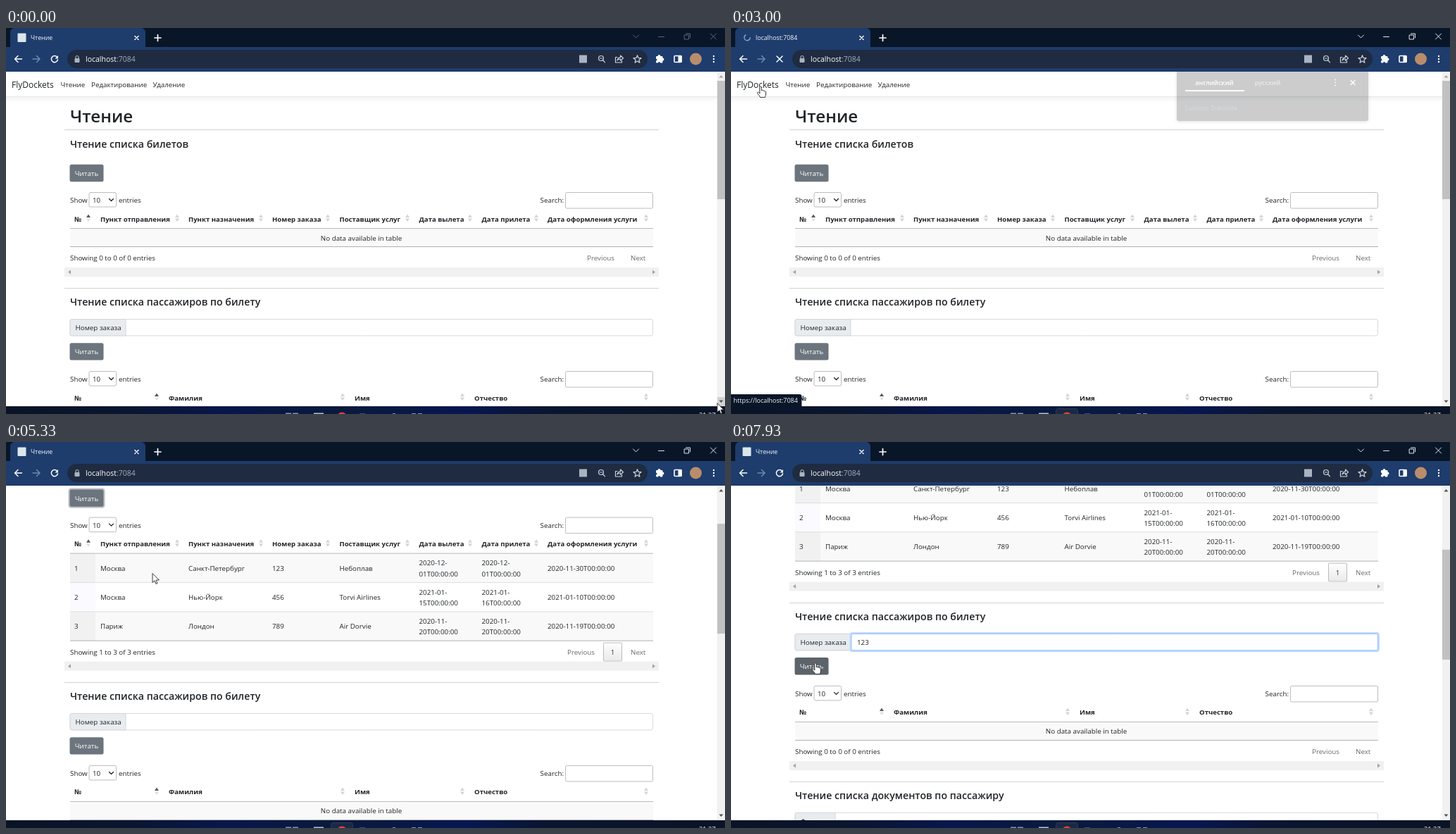
Write an HTML page with a canvas that moves like this. It is 1021 px wide and 548 px high and loops after 8 s.

```html
<!DOCTYPE html>
<html lang="ru">
<head>
<meta charset="utf-8">
<title>Чтение</title>
<style>
html, body { margin: 0; width: 100%; height: 100%; overflow: hidden; background: #fff; }
canvas { display: block; }
</style>
</head>
<body>
<canvas id="stage" width="1021" height="548"></canvas>
<script>
const stage = document.getElementById('stage').getContext('2d');
const layer = new OffscreenCanvas(1021, 548).getContext('2d');
let ctx = stage;
const LOOP = 8000, W = 1021, TOP = 62, BOTTOM = 537;
const FONT = '"Open Sans", "Noto Sans", sans-serif';
const BRAND = 'FlyDockets', HOST = 'localhost', PORT = ':7084';
const INK = '#212529', NAVY = '#091628', BLUE = '#1e3c6c';

const TICKET_COLS = [['№', 97, 117], ['Пункт отправления', 134, 243], ['Пункт назначения', 259, 362],
  ['Номер заказа', 378, 457], ['Поставщик услуг', 473.5, 570], ['Дата вылета', 586.5, 659],
  ['Дата прилета', 675.5, 753], ['Дата оформления услуги', 769, 909]];
const PERSON_COLS = [['№', 97, 214], ['Фамилия', 231, 478], ['Имя', 495, 648], ['Отчество', 665, 909]];
const TICKETS = [
  ['1', 'Москва', 'Санкт-Петербург', '123', 'Небоплав', '2020-12-01', '2020-12-01', '2020-11-30'],
  ['2', 'Москва', 'Нью-Йорк', '456', 'Torvi Airlines', '2021-01-15', '2021-01-16', '2021-01-10'],
  ['3', 'Париж', 'Лондон', '789', 'Air Dorvie', '2020-11-20', '2020-11-20', '2020-11-19']];

// time, x, y of the pointer tip
const PATH = [[70, 1010, 533], [870, 149, 82], [1130, 149, 82], [1530, 228, 83], [2270, 228, 83],
  [2600, 42, 83], [3200, 42, 83], [3600, 140, 130], [3870, 117, 203], [4480, 117, 203],
  [4870, 208, 187], [5330, 208, 187], [5730, 214, 248], [5870, 222, 259], [5930, 222, 259],
  [6130, 211, 276], [7400, 211, 276], [7880, 120, 314]];
const POINTERS = [[0, 'arrow'], [800, 'hand'], [3260, 'arrow'], [3800, 'hand'], [4550, 'arrow'],
  [5600, 'beam'], [7540, 'arrow'], [7740, 'hand']];
const SCROLL = [[5000, 0], [5330, 126], [5530, 199], [5730, 236.8], [5870, 239.4]];

const within = (t, a, b) => t >= a && t < b;
const clamp = u => Math.max(0, Math.min(1, u));
const smooth = u => u * u * (3 - 2 * u);
const latest = (list, t) => list.filter(e => e[0] <= t).pop()[1];

function track(keys, t, i, ease) {
  if (t <= keys[0][0]) return keys[0][i];
  for (let k = 1; k < keys.length; k++) {
    const a = keys[k - 1], b = keys[k];
    if (t < b[0]) return a[i] + (b[i] - a[i]) * ease((t - a[0]) / (b[0] - a[0]));
  }
  return keys[keys.length - 1][i];
}

function text(s, x, y, size = 9.8, color = INK, weight = 400, align = 'left') {
  ctx.font = `${weight} ${size}px ${FONT}`;
  ctx.fillStyle = color;
  ctx.textAlign = align;
  ctx.fillText(s, x, y);
  return ctx.measureText(s).width;
}
const heading = (s, x, y, size = 14.2) => text(s, x, y, size, INK, 600);

function rect(x, y, w, h, color) {
  ctx.fillStyle = color;
  ctx.fillRect(x, y, w, h);
}
function box(x, y, w, h, r, fill, stroke, line = 1) {
  const o = stroke ? 0.5 : 0;
  ctx.beginPath();
  ctx.roundRect(x + o, y + o, w - 2 * o, h - 2 * o, r);
  if (fill) { ctx.fillStyle = fill; ctx.fill(); }
  if (stroke) { ctx.strokeStyle = stroke; ctx.lineWidth = line; ctx.stroke(); }
}
function disc(x, y, r, color) {
  ctx.beginPath();
  ctx.arc(x, y, r, 0, 7);
  ctx.fillStyle = color;
  ctx.fill();
}
function shape(d, x, y, { fill, stroke, line = 1.4 } = {}) {
  const p = new Path2D(d);
  ctx.save();
  ctx.translate(x, y);
  ctx.lineJoin = ctx.lineCap = 'round';
  if (fill) { ctx.fillStyle = fill; ctx.fill(p); }
  if (stroke) { ctx.strokeStyle = stroke; ctx.lineWidth = line; ctx.stroke(p); }
  ctx.restore();
}
function clipPage(paint) {
  ctx.save();
  ctx.beginPath();
  ctx.rect(0, TOP, W, BOTTOM - TOP);
  ctx.clip();
  paint();
  ctx.restore();
}

function button(y, hover, focus) {
  if (focus) box(88.5, y - 2, 52, 28.4, 4, '#c0c4c8');
  box(90.5, y, 48, 24.4, 2.5, hover ? '#5c636a' : '#6c757d');
  text('Читать', 114.5, y + 16.2, 9.8, '#fff', 400, 'center');
}

function sorter(x, y, active) {
  shape('M-3 -1 L0 -5.5 L3 -1Z', x, y, { fill: active ? '#55585c' : '#d3d5d9' });
  shape('M-3 .5 L0 5 L3 .5Z', x, y, { fill: active ? '#dfe1e4' : '#d3d5d9' });
}

function ticketRow(row, i, y) {
  const h = 41.4, odd = i % 2 === 0;
  rect(91, y, 828, h, odd ? '#f9f9f9' : '#fff');
  rect(91, y, 36, h, odd ? '#f1f1f1' : '#fafaff');
  if (i) rect(91, y, 828, 1, '#dfdfdf');
  row.forEach((cell, c) => {
    const x = TICKET_COLS[c][1];
    if (c === 5 || c === 6) {
      text(cell.slice(0, 8), x, y + 17.5);
      text(cell.slice(8) + 'T00:00:00', x, y + 33);
    } else {
      text(c === 7 ? cell + 'T00:00:00' : cell, x, y + 25);
    }
  });
}

function table(y, cols, rows) {
  text('Show', 91, y + 15);
  box(117.5, y, 39.5, 21.5, 2, '#fff', '#bcbcbc');
  text('10', 123, y + 15);
  shape('M-3 -1.5 L0 1.5 L3 -1.5', 149.5, y + 11, { stroke: '#222', line: 1.3 });
  text('entries', 160, y + 15);
  text('Search:', 792, y + 15, 9.8, INK, 400, 'right');
  box(794, y, 125, 23.5, 2, '#fff', '#bcbcbc');
  cols.forEach(([name, x, sx], i) => {
    text(name, x, y + 41.5, 9.6, INK, 700);
    sorter(sx, y + 37, i === 0);
  });
  const end = y + (rows ? 175 : 77);
  if (rows) {
    rows.forEach((row, i) => ticketRow(row, i, y + 51 + i * 41.4));
  } else {
    rect(91, y + 51, 828, 26, '#f9f9f9');
    text('No data available in table', 504.5, y + 68.5, 9.8, INK, 400, 'center');
  }
  rect(91, y + 51, 828, 1, '#b9babb');
  rect(91, end, 828, 1, '#b0b1b2');
  const n = rows ? rows.length : 0;
  text(`Showing ${n ? 1 : 0} to ${n} of ${n} entries`, 91, end + 20);
  text('Previous', rows ? 836 : 864, end + 20, 9.8, '#6b6b6b', 400, 'right');
  text('Next', 887, end + 20, 9.8, '#6b6b6b');
  if (rows) {
    const g = ctx.createLinearGradient(0, end + 3, 0, end + 30);
    g.addColorStop(0, '#fff');
    g.addColorStop(1, '#e9e9e9');
    box(848, end + 3, 27, 27, 1, g, '#bbb');
    text('1', 861.5, end + 20, 9.8, '#333', 400, 'center');
  }
  rect(83, end + 30, 844, 13, '#f1f1f1');
  shape('M2 -3 L-2 0 L2 3Z', 90, end + 36.5, { fill: '#a3a3a3' });
  shape('M-2 -3 L2 0 L-2 3Z', 920, end + 36.5, { fill: '#a3a3a3' });
}

function group(y, label, w, value, focus, caret) {
  box(90.5, y, 828.5, 24.4, 2.5, '#fff', '#d6dbe0');
  box(90.5, y, w, 24.4, [2.5, 0, 0, 2.5], '#e9ecef', '#d2d7dc');
  text(label, 98.5, y + 16.2);
  if (focus) {
    box(88.5 + w, y - 2, 832.5 - w, 28.4, 4, '#c2dbfe');
    box(90.5 + w, y, 828.5 - w, 24.4, 2, '#fff', '#94bffe');
  }
  if (value) text(value, 99 + w, y + 16.2);
  if (caret) {
    ctx.font = `9.8px ${FONT}`;
    rect(Math.round(99 + w + ctx.measureText(value).width), y + 6, 1, 13, '#222');
  }
}

function navbar(width) {
  const g = ctx.createLinearGradient(0, 97, 0, 106);
  g.addColorStop(0, 'rgba(0,0,0,.05)');
  g.addColorStop(1, 'rgba(0,0,0,0)');
  rect(0, 97, width, 9, g);
  rect(0, 97, width, 1, '#e4e7ea');
  text(BRAND, 8, 85, 12);
  text('Чтение', 77.5, 84);
  text('Редактирование', 121, 84);
  text('Удаление', 208.5, 84);
}

function readPage(t) {
  const loaded = t >= 4330, s = track(SCROLL, t, 1, u => u);
  const rule = y => rect(83, y, 844, 1, '#d0d1d2');
  ctx.save();
  ctx.translate(0, -s);
  navbar(1010);
  heading('Чтение', 91, 133.5, 24.2);
  rule(144);
  heading('Чтение списка билетов', 91, 170);
  button(193.8, within(t, 3800, 5070), t >= 4200 && t < 6400);
  table(233, TICKET_COLS, loaded && TICKETS);
  ctx.translate(0, loaded ? 98.3 : 0);
  rule(369);
  heading('Чтение списка пассажиров по билету', 91, 394);
  const value = '123'.slice(0, t < 7070 ? 0 : t < 7190 ? 1 : t < 7400 ? 2 : 3);
  group(413, 'Номер заказа', 80, value, t >= 6390, within(t, 6390, 6870) || within(t, 7070, 7900));
  button(447.2, t >= 7740);
  table(487, PERSON_COLS);
  rule(623);
  heading('Чтение списка документов по пассажиру', 91, 648);
  group(667, 'Фамилия', 58, '');
  ctx.restore();

  rect(1010, TOP, 11, BOTTOM - TOP, '#f1f1f1');
  if (t < 130) rect(1010, 524, 11, 13, '#d2d2d2');
  rect(1010, 75 + s * 0.3254, 11, loaded ? 156 : 168, '#c1c1c1');
  shape('M-3 1.5 L0 -2 L3 1.5Z', 1015.5, 69, { fill: s ? '#505050' : '#a3a3a3' });
  shape('M-3 -1.5 L0 2 L3 -1.5Z', 1015.5, 530, { fill: '#505050' });
}

function plainPage(title) {
  navbar(W);
  heading(title, 98, 133.5, 24.2);
  rect(0, 498, W, 1, '#e1e4e7');
  text('© 2023 - ' + BRAND, 98, 522, 9.8, '#6c757d');
}

function status(s, width) {
  ctx.font = `9px ${FONT}`;
  box(0, 520, width || ctx.measureText(s).width + 9, 17, [0, 3, 0, 0], NAVY);
  text(s, 3.5, 532, 9, '#f1f4f8');
}

function statusBar(t) {
  const url = 'https://' + HOST + PORT;
  if (within(t, 930, 1130)) status(`${url}/${BRAND}/Editing`);
  else if (within(t, 1460, 1930) || within(t, 2200, 2400)) status(`${url}/${BRAND}/Deleting`);
  else if (within(t, 1930, 2200)) status('Ожидание кеша...', 340);
  else if (within(t, 2800, 3270)) status(url);
}

function popupCard() {
  ctx.clearRect(0, 0, W, 160);
  ctx.shadowColor = 'rgba(0,0,0,.5)';
  ctx.shadowBlur = 5;
  ctx.shadowOffsetY = 1;
  box(633, 60, 272, 72, 3, '#2b2d31');
  ctx.shadowColor = 'transparent';
  text('английский', 686.5, 81, 9, '#fff', 600, 'center');
  text('русский', 762, 81, 9, '#a4a9b0', 600, 'center');
  rect(645, 88, 84, 2, '#fff');
  [-4, 0, 4].forEach(d => disc(858, 77.5 + d, 1, '#dfe2e6'));
  shape('M-3 -3 L3 3 M3 -3 L-3 3', 883, 77.5, { stroke: '#fff' });
  text('Lumovo Translate', 645, 117, 9, '#60646a');
}

// The card is painted apart so that it fades as one piece.
function popup(t) {
  const a = Math.min(clamp((t - 2930) / 300), clamp((4330 - t) / 100));
  if (a <= 0) return;
  ctx = layer;
  popupCard();
  ctx = stage;
  ctx.globalAlpha = a;
  ctx.drawImage(layer.canvas, 0, 0);
  ctx.globalAlpha = 1;
}

function tabStrip(t, title, loading) {
  rect(0, 0, W, 28, NAVY);
  box(6, 0, 192, 30, [6, 6, 0, 0], BLUE);
  text(title, 35, 17, 8.8, '#f4f7fb');
  if (!loading) {
    box(16.5, 7.5, 12, 12.5, 1, '#dbe6ec');
  } else if (!within(t, 1900, 2000)) {
    const a = t / 160;
    ctx.beginPath();
    ctx.arc(23, 13.5, 4.2, a, a + 4.4);
    ctx.strokeStyle = '#8fa4c4';
    ctx.lineWidth = 1.4;
    ctx.stroke();
  }
  shape('M-2.6 -2.6 L2.6 2.6 M2.6 -2.6 L-2.6 2.6', 185.5, 14, { stroke: '#fff' });
  shape('M-4.5 0 H4.5 M0 -4.5 V4.5', 215.5, 14, { stroke: '#fff', line: 1.7 });
  const pen = { stroke: t < 980 ? '#5b6675' : '#dfe4ea', line: 1 };
  shape('M-4 -2 L0 2 L4 -2', 894.5, 12, pen);
  shape('M-4 0 H4', 930.5, 12.5, pen);
  shape('M-4 -2 H2 V4 H-4Z M-2 -4 H4 V2', 967.5, 12, pen);
  shape('M-4 -4 L4 4 M4 -4 L-4 4', 1004.5, 12, pen);
}

function toolbar(t, path, loading) {
  const white = { stroke: '#fff', line: 1.5 }, soft = { stroke: '#ccd3dd', line: 1.2 };
  rect(0, 27, W, 35, BLUE);
  shape('M5 0 H-4.5 M-.5 -4.5 L-5 0 L-.5 4.5', 17.5, 44, white);
  shape('M-5 0 H4.5 M.5 -4.5 L5 0 L.5 4.5', 43, 44, { stroke: '#7388a8', line: 1.5 });
  if (loading) {
    shape('M-4 -4 L4 4 M4 -4 L-4 4', 69, 44, white);
  } else {
    shape('M3.6 -2.8 A4.6 4.6 0 1 0 4.5 1', 69, 44, white);
    shape('M5 -5 V-.6 H.6Z', 69, 44, { fill: '#fff' });
  }
  box(87, 31, 824, 26, 13, '#1f2b40');
  box(97.5, 43, 7, 6, 1, '#aab3c0');
  shape('M-2 0 V-1.5 A2 2 0 0 1 2 -1.5 V0', 101, 43, { stroke: '#aab3c0', line: 1.2 });
  const w = text(HOST, 113, 48, 10.5, '#fff');
  text(PORT + path, 113 + w, 48, 10.5, '#a3adbb');

  if (within(t, 3130, 4450)) disc(819.5, 44, 12.5, '#4c5668');
  if (!within(t, 2130, 2500)) rect(814, 38.5, 11, 11, '#a9b3c2');
  shape('M3 -1 A3.5 3.5 0 1 1 -4 -1 A3.5 3.5 0 1 1 3 -1 M2 1.5 L5 4.8 M-2 -1 H1', 845.5, 44, soft);
  shape('M-2.5 -2.5 H-5 V5 H4 V2.5 M-2.5 2 C-2 -1 0 -2.2 2 -2.2 V-5 L6 -1.2 L2 2.4 V0 C0 0 -1.5 .6 -2.5 2Z', 870.5, 44, soft);
  let star = '';
  for (let i = 0; i < 10; i++) {
    const r = i % 2 ? 2.5 : 5.8, a = i * Math.PI / 5 - Math.PI / 2;
    star += `${i ? 'L' : 'M'}${r * Math.cos(a)} ${r * Math.sin(a)}`;
  }
  shape(star + 'Z', 896.5, 44.5, soft);
  box(923, 40, 9.5, 9.5, 1, '#fff');
  disc(927.5, 40, 1.9, '#fff');
  disc(932.5, 44.5, 1.9, '#fff');
  disc(923, 45, 1.5, BLUE);
  disc(927.5, 49.5, 1.5, BLUE);
  box(948.5, 39, 11, 10, 1, null, '#fff', 1.6);
  rect(954.5, 39, 5, 10, '#fff');
  disc(979.5, 44, 8.5, '#b98d6c');
  [-4, 0, 4].forEach(d => disc(1005, 44 + d, 1.2, '#fff'));
}

function taskbar(t) {
  const g = ctx.createLinearGradient(0, 0, W, 0);
  [[0, '#0a1426'], [0.17, '#0a1530'], [0.3, '#08164a'], [0.47, '#0a1a3c'], [0.64, '#071650'],
    [0.75, '#0a1530'], [1, '#0a1426']].forEach(([p, c]) => g.addColorStop(p, c));
  rect(0, BOTTOM, W, 11, g);
  if (t >= 980) box(461, 540, 32, 14, 3, '#1b2846', '#2b3958');
  rect(397, 546.5, 8, 2, '#8794a8');
  rect(407, 546.5, 8, 2, '#8794a8');
  rect(437, 546.5, 14, 2, '#b9c2cf');
  disc(477, 552.5, 7, '#d8453c');
  rect(502, 547, 8, 1, '#3c4c86');
  rect(549, 547, 4, 1, '#8a95a8');
  rect(576, 547, 6, 1, '#8a95a8');
  rect(585, 547, 6, 1, '#8a95a8');
  text('21:27', 984, 552.5, 9.3, '#fff');
}

function pointer(t) {
  const x = track(PATH, t, 1, smooth), y = track(PATH, t, 2, smooth), kind = latest(POINTERS, t);
  if (kind === 'arrow') {
    shape('M0 0 V12.5 L3 9.8 L5 14.5 L7 13.6 L5 9.1 L9 9Z', x, y, { fill: '#fff', stroke: '#222', line: 0.9 });
  } else if (kind === 'hand') {
    shape('M-1.4 1.2 C-1.4 -.4 1.2 -.4 1.2 1.2 V5.6 C2 4.8 3.3 5.2 3.4 6.2 C4.2 5.4 5.5 5.9 5.6 6.9 ' +
      'C6.5 6.3 7.5 7 7.5 8 V11 C7.5 13 6.6 13.6 6.4 15.4 H-.6 C-1 13.4 -3.4 11.6 -4.6 9.4 ' +
      'C-5 8 -3.4 7.6 -2.6 8.6 L-1.4 9.8Z', x, y, { fill: '#fff', stroke: '#222', line: 0.9 });
  } else {
    shape('M-3 -7 H-.8 L0 -6.4 L.8 -7 H3 M0 -6.4 V6.4 M-3 7 H-.8 L0 6.4 L.8 7 H3', x, y, { stroke: '#222', line: 1.1 });
  }
}

function draw(t) {
  const page = latest([[0, 'read'], [1130, 'edit'], [2130, 'delete'], [2930, 'read']], t);
  const loading = within(t, 980, 1400) || within(t, 1900, 2470) || within(t, 2870, 3730);
  const path = { read: '', edit: `/${BRAND}/Editing`, delete: `/${BRAND}/Deleting` }[page];
  const name = { read: 'Чтение', edit: 'Редактирование', delete: 'Удаление' }[page];
  const title = within(t, 2930, 3330) ? HOST + PORT : name;
  rect(0, 0, W, 548, '#fff');
  clipPage(() => {
    if (page === 'read') readPage(t);
    else plainPage(name);
    statusBar(t);
  });
  tabStrip(t, title, loading);
  toolbar(t, path, loading);
  clipPage(() => popup(t));
  taskbar(t);
  pointer(t);
}

const start = performance.now();
function tick() {
  draw((performance.now() - start) % LOOP);
  requestAnimationFrame(tick);
}
tick();
</script>
</body>
</html>
```
